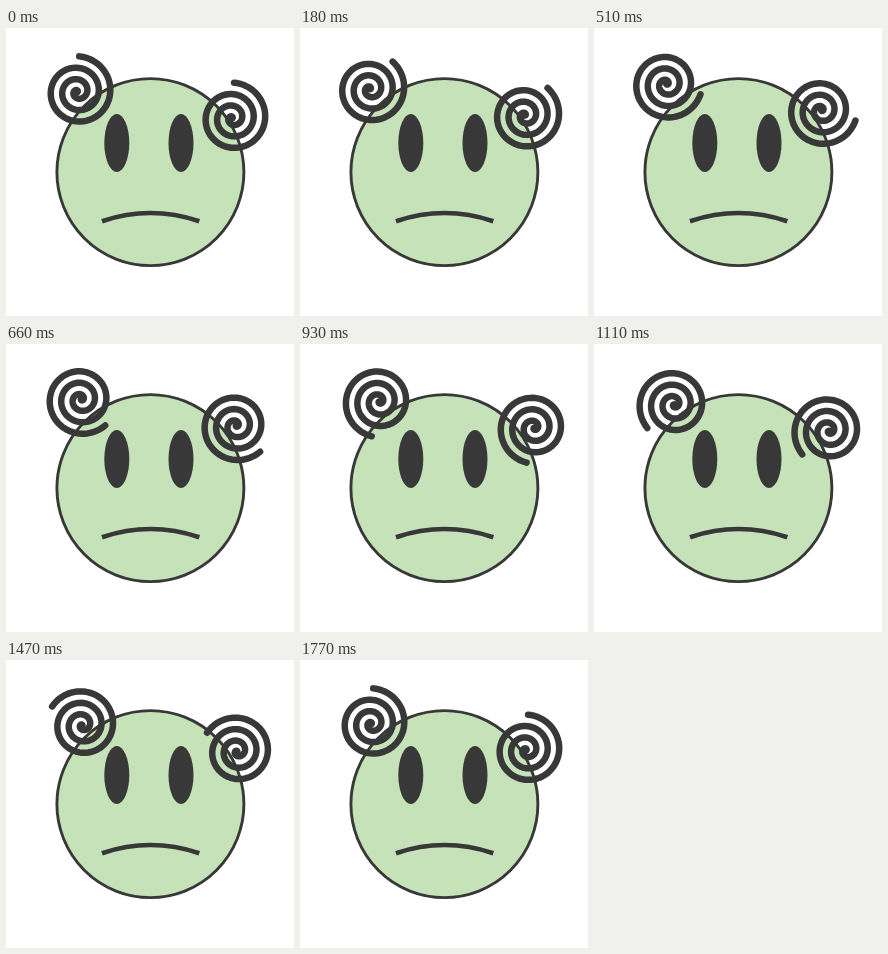
An HTML page that plays this animation: 288 by 288 pixels, repeating every 1800 ms.

```html
<!DOCTYPE html>
<html lang="en">
<head>
<meta charset="utf-8">
<title>Dizzy face</title>
<style>
  html, body { margin: 0; width: 100%; height: 100%; overflow: hidden; background: #fff; }
  svg { display: block; width: 100vw; height: 100vh; }
</style>
</head>
<body>
<svg viewBox="0 0 288 288" fill="none" stroke="#383838">
  <circle cx="144.4" cy="144.1" r="93.5" fill="#c6e2b9" stroke-width="2.9"/>
  <g fill="#383838" stroke="none">
    <ellipse cx="110.8" cy="115" rx="12.5" ry="29"/>
    <ellipse cx="175" cy="115" rx="12.5" ry="29"/>
  </g>
  <path d="M96 193.2Q144.5 176.8 193.3 193.2" stroke-width="4.7"/>
  <g stroke-width="6.5" stroke-linecap="round" stroke-linejoin="round">
    <path class="spiral"/>
    <path class="spiral"/>
  </g>
</svg>
<script>
const LOOP = 1800, STEP = 30, LAST = LOOP / STEP - 1;
const TILT = 2.5;
const PIVOTS = [[75, 60.4], [229.9, 86.7]];
const spirals = document.querySelectorAll('.spiral');

// Archimedean spiral, wound clockwise from its outer tip; its centre lies off the pivot
function spiralPath(radius, pitch, cx, cy) {
  const points = [];
  const sweep = radius / pitch * 2 * Math.PI;
  const count = 240;
  for (let i = 0; i <= count; i++) {
    const a = sweep * i / count;
    const r = radius * (1 - i / count);
    points.push((cx + r * Math.sin(a)).toFixed(2) + ' ' + (cy - r * Math.cos(a)).toFixed(2));
  }
  return 'M' + points.join('L');
}

const shape = spiralPath(35.4, 11.5, -3.2, 3.5);
spirals.forEach(s => s.setAttribute('d', shape));

function draw(now) {
  const step = Math.floor(now % LOOP / STEP);
  const angle = TILT + step * 360 / LAST;
  spirals.forEach((s, i) =>
    s.setAttribute('transform', `translate(${PIVOTS[i]}) rotate(${angle})`));
}

const start = performance.now();
function tick() {
  draw(performance.now() - start);
  requestAnimationFrame(tick);
}
tick();
</script>
</body>
</html>
```
